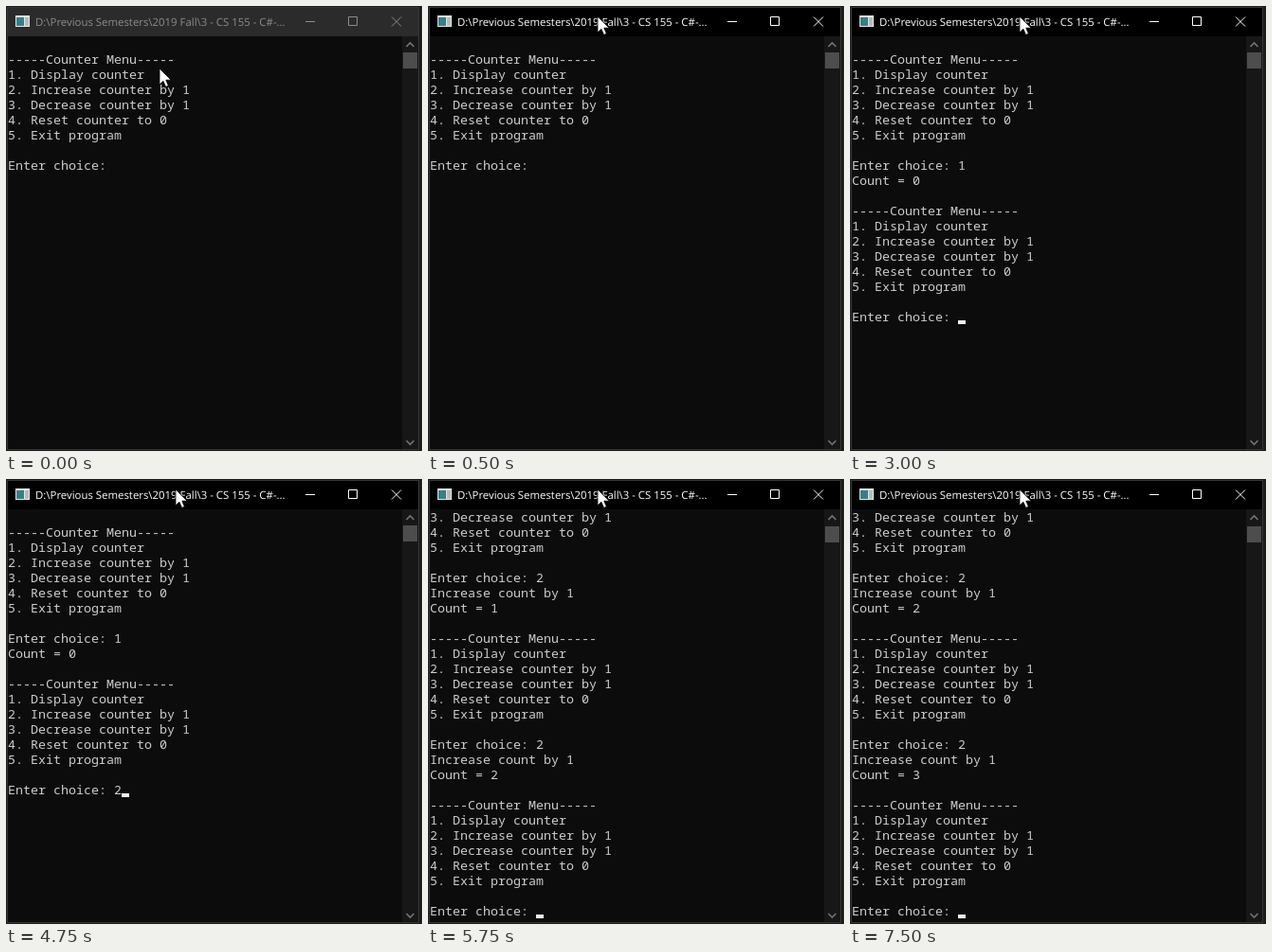
These frames come from a looping animation (439 by 470 pixels, 8 s). An HTML page:

```html
<!DOCTYPE html>
<html lang="en">
<head>
<meta charset="utf-8">
<title>Counter console</title>
<style>
  html, body { margin: 0; width: 100%; height: 100%; overflow: hidden; background: #1c1c1c; }
  #stage { position: relative; width: 439px; height: 470px; overflow: hidden; --ink: #fff; --bar: #000; }
  #stage.inactive { --ink: #8c8c8c; --bar: #2b2b2b; }
  svg { position: absolute; left: 0; top: 0; }
  svg text { font: 11.4px "Open Sans", "Noto Sans", sans-serif; fill: var(--ink); text-rendering: geometricPrecision; }
  #screen {
    position: absolute; left: 2px; top: 32px; width: 416px; height: 432px; margin: 0; overflow: hidden;
    font: 13.3333px/16px "Noto Sans Mono", "DejaVu Sans Mono", monospace; color: #ccc;
  }
  #caret { position: absolute; width: 8px; height: 4px; background: #f2f2f2; }
</style>
</head>
<body>
<div id="stage">
  <svg width="439" height="470">
    <rect x="1.5" y="1.5" width="434" height="467" fill="#0c0c0c" stroke="#363636"/>
    <rect x="2" y="2" width="433" height="30" fill="var(--bar)"/>
    <g shape-rendering="crispEdges">
      <rect x="10" y="10" width="15" height="12" fill="#e4e8e8"/>
      <rect x="11" y="12" width="8" height="9" fill="#377f86"/>
      <rect x="20" y="12" width="4" height="9" fill="#b4bcbe"/>
    </g>
    <text x="31" y="21">D:\Previous Semesters\2019 Fall\3 - CS 155 - C#-...</text>
    <path d="M316 16.5h10M361.5 11.5h9v9h-9zM407 11.5l10 10m0-10l-10 10" fill="none" stroke="var(--ink)"/>
    <rect x="418" y="32" width="17" height="436" fill="#171717"/>
    <rect id="thumb" x="419" y="49" width="15" height="17" fill="#4d4d4d"/>
    <path d="M422.5 43l4-4 4 4M422.5 459l4 4 4-4" fill="none" stroke="#747474" stroke-width="1.6"/>
  </svg>
  <pre id="screen"></pre>
  <div id="caret"></div>
  <svg width="439" height="470">
    <path id="pointer" d="M0 0V17L3.9 13.3L6.6 19.4L9.4 18.2L6.8 12.2H12.2Z" fill="#fff" stroke="#000" stroke-width=".8"/>
  </svg>
</div>
<script>
const LOOP = 8000, ROWS = 27, LINE = 16, CELL = 8;
const MENU = ["", "-----Counter Menu-----", "1. Display counter", "2. Increase counter by 1",
  "3. Decrease counter by 1", "4. Reset counter to 0", "5. Exit program", ""];
const PROMPT = "Enter choice: ";

// start time, choices already entered, text being typed, caret visible
const STEPS = [
  [0, "", "", false], [1000, "", "", true], [1500, "", "", false],
  [2000, "", "", true], [2500, "", "", false],
  [3000, "1", "", true], [3750, "1", "", false], [4250, "1", "", true], [4750, "1", "2", true],
  [5000, "12", "", true], [5500, "12", "2", true],
  [5750, "122", "", true], [6250, "122", "", false], [6750, "122", "2", true],
  [7250, "1222", "", true],
];

const find = id => document.getElementById(id);
const stage = find("stage"), screen = find("screen"), caret = find("caret");
const thumb = find("thumb"), pointer = find("pointer");

function consoleLines(choices, typed) {
  const lines = [];
  let count = 0;
  for (const choice of choices) {
    lines.push(...MENU, PROMPT + choice);
    if (choice === "2") {
      count++;
      lines.push("Increase count by 1");
    }
    lines.push("Count = " + count);
  }
  return lines.concat(MENU, PROMPT + typed);
}

function draw(time) {
  const [, choices, typed, caretOn] = STEPS.findLast(step => step[0] <= time);
  const lines = consoleLines(choices, typed);
  const visible = lines.slice(-ROWS);

  screen.textContent = visible.join("\n");
  caret.hidden = !caretOn;
  caret.style.left = 2 + (PROMPT + typed).length * CELL + "px";
  caret.style.top = 32 + visible.length * LINE - 4 + "px";
  thumb.setAttribute("y", lines.length > ROWS ? 50 : 49);
  stage.classList.toggle("inactive", time < 500);
  pointer.setAttribute("transform", time < 250 ? "translate(162 66)" : "translate(179 11)");
}

const start = performance.now();
function tick() {
  draw((performance.now() - start) % LOOP);
  requestAnimationFrame(tick);
}
tick();
</script>
</body>
</html>
```
